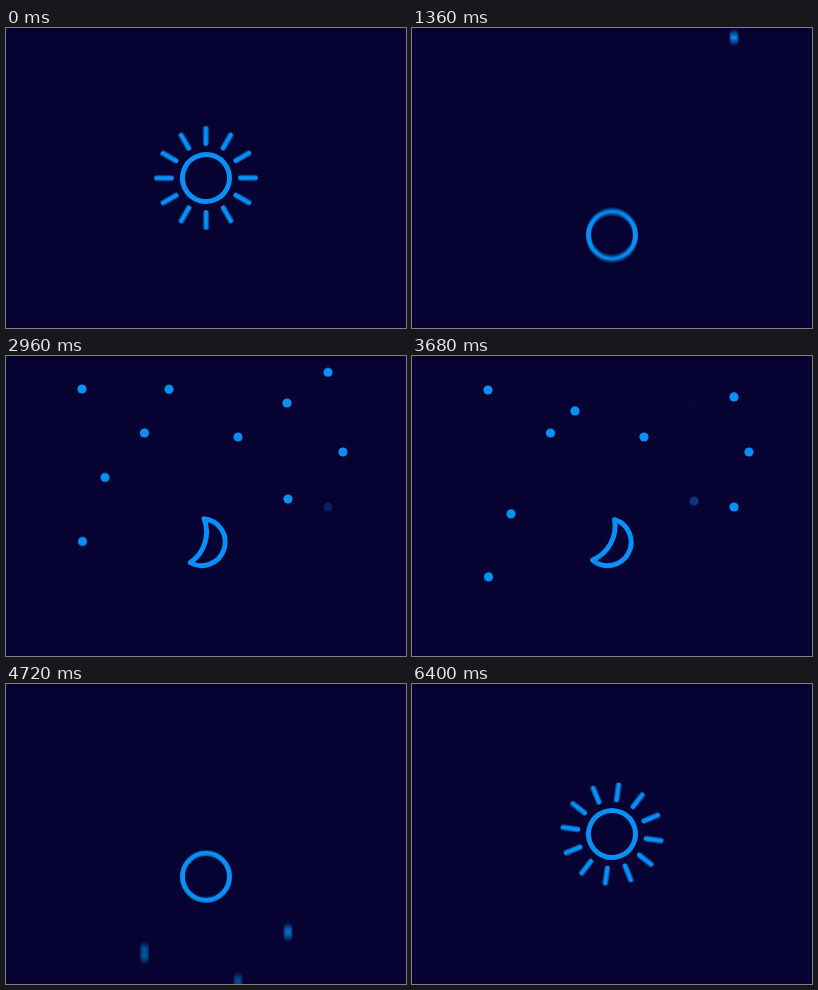
An HTML page with a canvas for the animation above (6.48 s loop, 400 px wide and 300 px high).

```html
<!DOCTYPE html>
<html lang="en">
<head>
<meta charset="utf-8">
<title>Day and night</title>
<style>
  html, body { margin: 0; width: 100%; height: 100%; overflow: hidden; background: #060332; }
  canvas { display: block; width: 400px; height: 300px; }
</style>
</head>
<body>
<canvas id="stage" width="400" height="300"></canvas>
<script>
const LOOP = 6480, NOON = 3000, BG = '#060332', BLUE = '#0890f6';
const R = 23.5, LINE = 5, DOT = 4.6;
const SPIN = 0.098;              // degrees per ms
const GRAVITY = 0.000328;        // px per ms squared
const SHUTTER = 32, SAMPLES = 8; // motion blur window in ms

const screen = document.getElementById('stage').getContext('2d');
const buffer = screen.canvas.cloneNode();
const ctx = buffer.getContext('2d');

// x, y and later sinking, in the order in which the stars fall
const stars = [
  [322, 16, 25], [76, 33, 1], [281, 47], [322, 151], [163, 33, 22], [337, 96],
  [232, 81], [138.5, 77], [99, 121, 37], [76.5, 185, 36], [282, 143, 2]
];

const clamp = v => Math.max(0, Math.min(1, v));
const ramp = (t, from, to) => clamp((t - from) / (to - from));
const ease = (t, from, to) => { const p = ramp(t, from, to); return p * p * (3 - 2 * p); };
const backOut = p => { const u = p - 1; return 1 + u * u * (2.70158 * u + 1.70158); };
const rad = deg => deg * Math.PI / 180;

function drawStar([x, y, sink = 0], i, t) {
  const rise = i ? 1440 + 4 * i : 970;
  if (t < rise || t > 5000) return;
  const up = backOut(ramp(t, rise, rise + (i ? 690 : 1000)));
  const slide = 1 - (1 - ramp(t, 2960, 3720)) ** 2;
  const drop = Math.max(0, t - 3760 - 4 * i * i);
  const blink = 2000 + (1206 + 1156.6 * i) % 1838;
  ctx.globalAlpha = clamp(Math.abs(t - blink) / 160);
  ctx.beginPath();
  ctx.arc(x, 320 + (y - 320) * up + sink * slide + GRAVITY * drop * drop, DOT, 0, 7);
  ctx.fill();
  ctx.globalAlpha = 1;
}

function drawRays(t) {
  const spin = SPIN * (t < NOON ? -t : LOOP - t);
  for (let i = 0; i < 12; i++) {
    const order = (i + 2) % 12;
    const size = t < NOON
      ? 1 - clamp((t - 730 - order * 16) / 80)
      : clamp((t - 5095 - order * 55) / 40);
    if (!size) continue;
    const a = rad(spin + i * 30 - 90), c = Math.cos(a), s = Math.sin(a);
    const near = 34.5, far = near + 15 * size;
    ctx.lineWidth = LINE * Math.min(1, size * 2);
    ctx.beginPath();
    ctx.moveTo(c * near, s * near);
    ctx.lineTo(c * far, s * far);
    ctx.stroke();
  }
}

function drawBody(t, moon) {
  ctx.lineWidth = LINE;
  ctx.rotate(rad(5 + (t - 2160) * 0.0155));
  // the left side swings from a full round to the hollow of the crescent
  const tipX = -4.5, tipY = Math.hypot(R, tipX) - 0.9;
  const sag = tipX - R + 2 * -tipX + (27 * moon);
  const bend = Math.min(5000, (sag * sag + tipY * tipY) / (2 * Math.abs(sag) + 1e-6));
  ctx.stroke(moon
    ? new Path2D(`M${tipX} ${-tipY}A${R} ${R} 0 1 1 ${tipX} ${tipY}` +
                 `A${bend} ${bend} 0 0 ${sag < 0 ? 1 : 0} ${tipX} ${-tipY}Z`)
    : new Path2D(`M${R} 0A${R} ${R} 0 1 1 ${-R} 0A${R} ${R} 0 1 1 ${R} 0Z`));
}

function drawScene(t) {
  ctx.fillStyle = BG;
  ctx.fillRect(0, 0, 400, 300);
  ctx.fillStyle = ctx.strokeStyle = BLUE;
  ctx.lineCap = ctx.lineJoin = 'round';
  stars.forEach((star, i) => drawStar(star, i, t));

  const moon = ease(t, 1480, 1960) - ease(t, 4160, 4560);
  const sunset = 90 * ease(t, 800, 1040) - 54 * ease(t, 1040, 1600);
  const sunrise = 7 * ease(t, 4400, 4720) - 88 * ease(t, 4720, 4900) + 45 * ease(t, 4900, 5060);
  ctx.save();
  ctx.translate(200 - 4.5 * moon, 150 + sunset + sunrise);
  drawRays(t);
  drawBody(t, moon);
  ctx.restore();
}

// average several moments within the shutter time
function draw(t) {
  for (let k = 0; k < SAMPLES; k++) {
    drawScene(t + SHUTTER * ((k + 0.5) / SAMPLES - 0.5));
    screen.globalAlpha = 1 / (k + 1);
    screen.drawImage(buffer, 0, 0);
  }
}

const start = performance.now();
function tick() {
  draw((performance.now() - start) % LOOP);
  requestAnimationFrame(tick);
}
tick();
</script>
</body>
</html>
```
